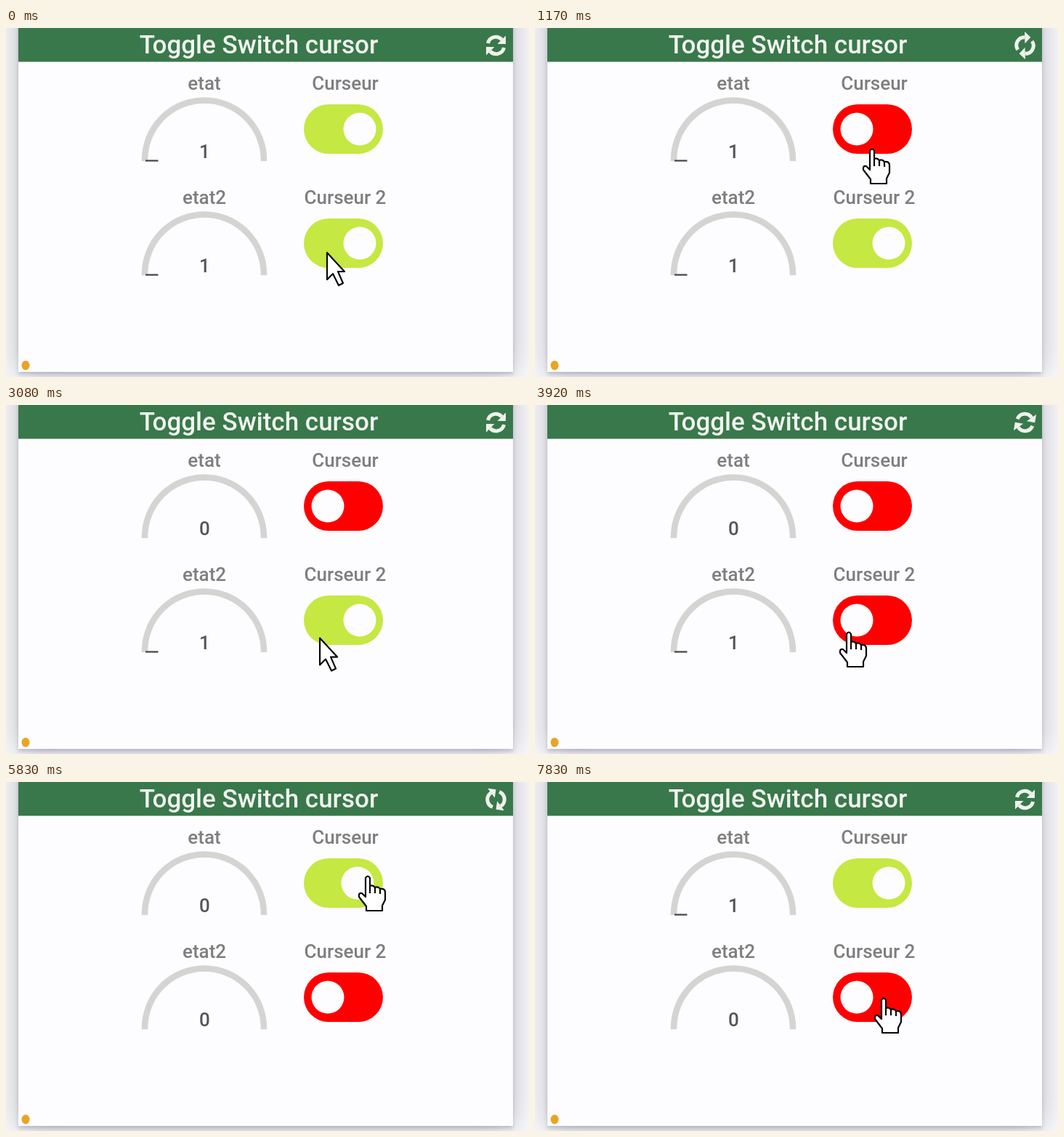
An HTML page for the animation above (8000 ms loop, 720 by 480 pixels).

```html
<!DOCTYPE html>
<html lang="fr">
<head>
<meta charset="utf-8">
<style>
  html, body { margin: 0; width: 100%; height: 100%; overflow: hidden; }
  body { background: #fafafc; position: relative; }
  #card, #lift { position: absolute; left: 17px; top: -60px; width: 681px; height: 533px; }
  #card { background: #fdfcfe; box-shadow: 0 3px 5px rgba(120, 120, 145, .36); }
  #lift { box-shadow: 0 2px 36px rgba(120, 120, 140, .5); }
  svg { position: absolute; left: 0; top: 0; }
  text { font: 500 26px Roboto, Arial, sans-serif; text-anchor: middle; fill: #7e7e7e; }
  .title { font-size: 35px; fill: #f1f4f0; }
  .value { fill: #555; }
  .icon { fill: #eef2ec; }
  .cursor { fill: #fff; stroke: #080808; stroke-width: 2.2; stroke-linejoin: round; }
</style>
</head>
<body>
<div id="lift"></div>
<div id="card"></div>
<svg width="720" height="480" viewBox="0 0 720 480">
  <defs>
    <g id="half" class="icon">
      <path d="M-11-3A11 11 0 0 1 8-8" fill="none" stroke="#eef2ec" stroke-width="5"/>
      <path d="M13.5-13.5V-2H2Z"/>
    </g>
  </defs>
  <rect x="17" width="681" height="46.5" fill="#39784a"/>
  <text class="title" x="348" y="35">Toggle Switch cursor</text>
  <g id="spinner"><use href="#half"/><use href="#half" transform="rotate(180)"/></g>
  <g id="rows"></g>
  <ellipse id="dot" cx="27" cy="464" rx="5.5" ry="6.5" fill="#e8a424"/>
  <g id="pointer" class="cursor">
    <path id="arrow" d="M1 1V38L9 30L17 46L23 43L16 27H25Z"/>
    <g id="hand">
      <path d="M-3 2Q0-3 3 2V13Q7 11 10 15Q14 13 17 17Q24 16 24 22V32L20 40V47H-2V41L-12 28Q-13 22-8 23L-3 28Z"/>
      <path d="M3 13V23M10 15V23M17 17V24" fill="none"/>
    </g>
  </g>
</svg>
<script>
const LOOP = 8000, STEP = 1000 / 12, SPIN = 1200;
const $ = id => document.getElementById(id);
const clamp = x => Math.min(1, Math.max(0, x));
const smooth = x => x * x * (3 - 2 * x);
const ramp = (t, from, to) => smooth(clamp((t - from) / (to - from)));
const mix = (a, b, k) => a + (b - a) * k;

// time, x, y of the pointer
const route = [
  [0, 441, 308], [70, 441, 308], [720, 464, 167], [1380, 464, 167],
  [1990, 703, 450], [2260, 703, 450], [3070, 431, 320],
  [3160, 432, 313], [4850, 432, 313], [5410, 498, 130], [7590, 498, 130],
  [7830, 480, 298], [LOOP, 480, 298]
];
const handSpans = [[580, 1480], [3160, 4990], [5240, 7690], [7780, LOOP]];
const clicks = [795, 3390, 5560];

const rows = [
  { y: 0, gauge: 'etat', label: 'Curseur',
    on: t => 1 - ramp(t, 780, 1120) + ramp(t, 5540, 5890),
    value: t => t < 2160 || t > 6740, tick: t => t < 2320 || t > 6900 },
  { y: 157, gauge: 'etat2', label: 'Curseur 2',
    on: t => 1 - ramp(t, 3330, 3670),
    value: t => t < 4570, tick: t => t < 4740 }
];

$('rows').innerHTML = rows.map((r, i) => `
  <g transform="translate(0 ${r.y})">
    <text x="273" y="84.5">${r.gauge}</text>
    <text x="467" y="84.5">${r.label}</text>
    <path d="M191 183V181.5A82 82 0 0 1 355 181.5V183" fill="none" stroke="#d4d4d2" stroke-width="8.5"/>
    <path id="tick${i}" d="M192 182.5H209.5" stroke="#444" stroke-width="2.2"/>
    <text id="value${i}" class="value" x="273.5" y="178.8"></text>
    <rect id="track${i}" x="410" y="105" width="109" height="68" rx="34"/>
    <circle id="knob${i}" cy="139" r="22.5" fill="#fdfcfe"/>
  </g>`).join('');

function pointerAt(t) {
  const i = Math.max(1, route.findIndex(p => p[0] > t));
  const [a, b] = [route[i - 1], route[i]];
  const k = ramp(t, a[0], b[0]);
  return [mix(a[1], b[1], k), mix(a[2], b[2], k)];
}

function draw(t) {
  rows.forEach((r, i) => {
    const k = r.on(t), tint = clamp(k * 1.2);
    $('value' + i).textContent = r.value(t) ? 1 : 0;
    $('tick' + i).style.display = r.tick(t) ? '' : 'none';
    $('knob' + i).setAttribute('cx', mix(443, 487, k));
    $('track' + i).setAttribute('fill',
      `rgb(${mix(255, 197, tint)},${mix(0, 232, tint)},${mix(0, 66, tint)})`);
  });

  const start = clicks.find(c => t >= c && t < c + SPIN);
  const angle = start ? (t - start) * .36 : 0;
  $('spinner').setAttribute('transform', `translate(674.5 24) rotate(${angle})`);

  const hover = 1 - ramp(t, 1750, 2000) + ramp(t, 2300, 2600);
  $('lift').style.opacity = hover;
  $('dot').style.display = hover > .5 ? '' : 'none';

  const hand = handSpans.some(([a, b]) => t >= a && t < b);
  $('pointer').setAttribute('transform', `translate(${pointerAt(t)})`);
  $('hand').style.display = hand ? '' : 'none';
  $('arrow').style.display = hand ? 'none' : '';
}

function tick() {
  const t = performance.now() % LOOP;
  draw(Math.floor((t + 4) / STEP) * STEP % LOOP);
  requestAnimationFrame(tick);
}
tick();
</script>
</body>
</html>
```
